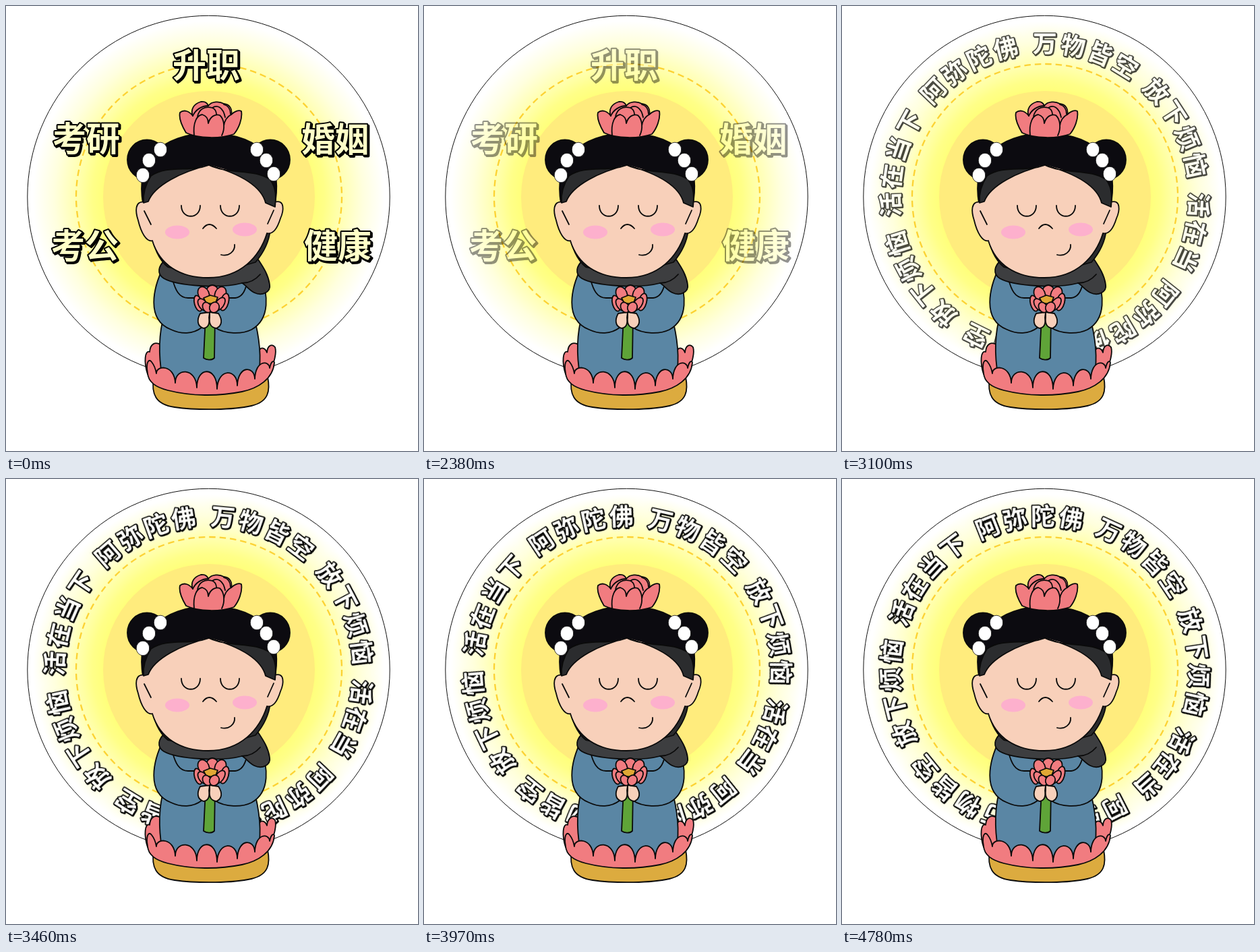
An HTML page that plays this animation: 611 px wide and 660 px high, repeating every 4.81 s.

```html
<!DOCTYPE html>
<html lang="zh-CN">
<head>
<meta charset="utf-8">
<title>Blessing</title>
<style>
  html, body { margin: 0; width: 100%; height: 100%; overflow: hidden; background: #fff; }
  svg { display: block; width: 611px; height: 660px; }
  text {
    font-family: "Noto Sans CJK SC", "Noto Sans CJK", sans-serif;
    font-weight: 700; text-anchor: middle;
    stroke: #000; stroke-linejoin: round; paint-order: stroke;
  }
  #words { fill: #ffffc8; font-size: 50px; stroke-width: 4; filter: drop-shadow(2.5px 2.5px 0 #000); }
  #ring { fill: #fffffa; font-size: 36px; filter: drop-shadow(1.4px 1.6px 0 #000) drop-shadow(0 0 7px #ffffdc); }
  #ring text { stroke-width: 3; }
  #wheel { transform-origin: 300.5px 284px; }
  .ink { stroke: #0a0a0a; stroke-width: 1.8; stroke-linejoin: round; stroke-linecap: round; }
  .line { fill: none; }
  .pink { fill: #f17c80; }
  .skin { fill: #f8d0ba; }
  .blue { fill: #5a86a4; }
  .hair { fill: #0c0b10; }
  .dark { fill: #2b2c2e; }
  .scarf { fill: #3d3e40; }
</style>
</head>
<body>
<svg viewBox="0 0 611 660">
  <defs>
    <radialGradient id="halo">
      <stop offset=".58" stop-color="#ffff7a"/>
      <stop offset=".64" stop-color="#ffff88"/>
      <stop offset=".73" stop-color="#ffffb0"/>
      <stop offset=".85" stop-color="#ffffde"/>
      <stop offset=".97" stop-color="#fff"/>
    </radialGradient>
  </defs>

  <circle cx="300.5" cy="283" r="268.7" fill="url(#halo)" stroke="#111" stroke-width="1"/>
  <circle cx="301" cy="283" r="157" fill="#ffec7d"/>
  <circle cx="301" cy="283" r="197" fill="none" stroke="#fcd233" stroke-width="2.3" stroke-dasharray="9.5 5.97"/>

  <g id="ring"><g id="wheel"></g></g>
  <g id="words"></g>

  <g class="ink">
    <!-- seat -->
    <path fill="#dcab3f" d="M219 550C215 576 222 591 250 595C285 600 338 599 364 593C390 587 392 570 388 550Z"/>
    <path class="pink" d="M210 546C204 528 206 510 213 513C214 500 222 498 229 502L234 546Z"/>
    <path class="pink" d="M374 545L376 510C379 505 385 508 387 514C388 502 395 501 399 506C402 515 397 529 391 547Z"/>

    <!-- robe -->
    <path class="blue" d="M232 468C225 500 227 530 234 562L372 558C380 530 377 500 370 470Z"/>
    <path class="blue" d="M234 386C218 418 207 465 245 480C260 487 277 487 290 477L310 477C325 487 350 487 364 480C393 464 388 425 378 402L360 380Z"/>
    <path class="line" d="M247 406C251 420 256 433 270 433L340 433C350 432 355 421 357 412"/>

    <!-- seat petals -->
    <path class="pink" d="M210 545C207 528 212 522 216 528C220 533 222 539 223 545
      C223 532 250 532 251 559C251 536 282 536 283 566C283 534 313 534 313 568
      C314 537 343 537 343 563C344 533 368 533 369 553C370 525 390 525 391 537
      C393 527 397 525 398 529C396 553 374 567 350 572C315 579 275 579 240 570C220 565 211 556 210 545Z"/>

    <!-- scarf and hair behind the jaw -->
    <path class="scarf" d="M236 377C226 385 223 397 234 404C255 416 320 419 350 411C356 414 360 421 368 425C380 431 393 424 391 413C389 399 382 388 374 376Z"/>
    <path class="line" d="M350 411C362 411 371 405 377 398"/>
    <path class="dark" d="M214 330C218 356 226 376 240 387L300 400L370 380C382 366 390 350 392 332Z"/>

    <!-- buns and hair -->
    <ellipse class="hair" cx="209" cy="228" rx="29" ry="29.5"/>
    <ellipse class="hair" cx="392" cy="228" rx="29" ry="29.5"/>
    <path class="hair" d="M203 293C198 262 202 240 220 218C238 199 268 189 300 189C340 189 372 200 390 225C402 243 404 270 398 298L300 270Z"/>

    <!-- ears and face -->
    <path class="skin" d="M206 291C190 288 192 306 196 318C200 335 208 351 218 348L226 300Z"/>
    <path class="skin" d="M398 291C414 286 412 304 407 315C402 331 396 339 386 337L380 300Z"/>
    <path class="skin" stroke="none" d="M206 292C208 320 214 338 217 348C228 384 258 403 300 403C348 403 376 372 387 337C394 318 397 305 398 296C380 260 340 244 301 236C262 244 222 262 206 292Z"/>
    <path class="line" d="M217 348C228 384 258 403 300 403C348 403 376 372 387 337M205 304L215 324M397 303L388 323"/>

    <!-- fringe -->
    <path class="dark" d="M301 236C272 247 240 235 215 252C206 266 203 280 204 292L211 290C220 266 260 246 301 236Z"/>
    <path class="dark" d="M301 236C330 250 370 241 392 258C402 272 400 286 399 298L385 292C378 265 344 248 301 236Z"/>
    <g id="pearls" fill="#fff"></g>

    <!-- crown -->
    <path class="pink" d="M267 188C261 178 256 166 258 158C264 153 272 156 277 163C273 153 279 145 289 142C296 141 299 145 300 148C305 141 317 141 323 145C332 146 336 153 334 161C339 156 345 154 349 156C351 167 345 182 338 190C318 197 286 197 267 188Z"/>
    <path class="line" d="M279 192C277 173 283 162 291 161C298 163 300 168 300 174C303 163 311 160 317 162C324 168 325 182 320 192M277 163C281 154 290 148 300 148M284 164C286 153 295 148 306 151C311 153 312 157 312 161M306 151C313 146 322 150 325 165M334 161C328 164 324 170 323 178M323 146C330 148 333 154 333 160"/>

    <!-- features -->
    <path class="line" d="M260 296C260 317 288 317 288 296M318 296C318 317 346 317 346 296M292 330C298 322 305 322 312 330M319 369C330 372 340 364 339 354"/>
    <g fill="#fdb0cd" stroke="none">
      <ellipse cx="254" cy="335.5" rx="18" ry="10"/>
      <ellipse cx="354" cy="331.5" rx="18" ry="10"/>
    </g>

    <!-- flower and hands -->
    <path fill="#5fa438" d="M296 460L310 460L309 522C305 526 297 525 293 522Z"/>
    <path class="skin" d="M288 456C283 465 283 475 293 478C301 477 302 470 301 462L302 454Z"/>
    <path class="skin" d="M315 456C321 465 321 474 312 478C303 477 301 470 302 462L302 454Z"/>
    <g id="bloom" class="pink"></g>
  </g>
</svg>
<script>
  const $ = id => document.getElementById(id);
  const add = (parent, tag, attrs, label = '') => {
    const el = document.createElementNS('http://www.w3.org/2000/svg', tag);
    for (const k in attrs) el.setAttribute(k, attrs[k]);
    el.textContent = label;
    parent.append(el);
    return el;
  };

  [['升职', 297, 87], ['考研', 119, 196], ['婚姻', 488, 197], ['考公', 117, 355], ['健康', 492, 355]]
    .forEach(([s, x, y]) => add($('words'), 'text', { x, y: y + 19 }, s));

  // Mantra set around a circle; a space takes less room than a character.
  const mantra = '阿弥陀佛 万物皆空 放下烦恼 活在当 阿弥陀佛 万物皆空 放下烦恼 活在当下';
  const cx = 300.5, cy = 284, radius = 229;
  let angle = -46.2;
  for (const ch of mantra) {
    if (ch === ' ') { angle += 4.3; continue; }
    add($('wheel'), 'text', {
      x: cx, y: cy - radius + 13.7, transform: `rotate(${angle} ${cx} ${cy})`
    }, ch);
    angle += 10.5;
  }

  [[229, 213], [212, 229], [203, 251], [372, 213], [386, 229], [397, 249]]
    .forEach(([x, y]) => add($('pearls'), 'ellipse', { cx: x, cy: y, rx: 9.8, ry: 10.8, 'stroke-width': 0.8 }));

  const petal = (x, y, rx, ry, turn) =>
    add($('bloom'), 'ellipse', { cx: x, cy: y, rx, ry, transform: `rotate(${turn} ${x} ${y})` });
  [[305, 438, 18, 15, 0], [306, 424, 9, 10, 0], [293, 427, 8, 11, -25], [318, 427, 8, 11, 25],
   [285, 441, 5.5, 12, -15], [324, 439, 6, 13, 15]].forEach(p => petal(...p));
  add($('bloom'), 'path', { d: 'M293 433L303 429L314 432L310 442L297 441Z', fill: '#e0a834' });
  [[292, 443, 6, 10, -35], [317, 442, 6, 11, 35], [298, 447, 6, 8, -30], [309, 447, 7, 8, 30]]
    .forEach(p => petal(...p));

  // Timeline in ms
  const loop = 4810, speed = 14.6 / 1000;
  const spin = t => `rotate(${(t - 3100) * speed}deg)`;
  const play = (id, frames) => $(id).animate(frames, { duration: loop, iterations: Infinity });
  const fade = (id, from, to, start, end) => play(id, [
    { opacity: from, offset: 0 }, { opacity: from, offset: start / loop },
    { opacity: to, offset: end / loop }, { opacity: to, offset: 1 }
  ]);
  fade('words', 1, 0, 1900, 2740);
  fade('ring', 0, 1, 2600, 3290);
  play('wheel', [{ transform: spin(0) }, { transform: spin(loop) }]);
</script>
</body>
</html>
```
